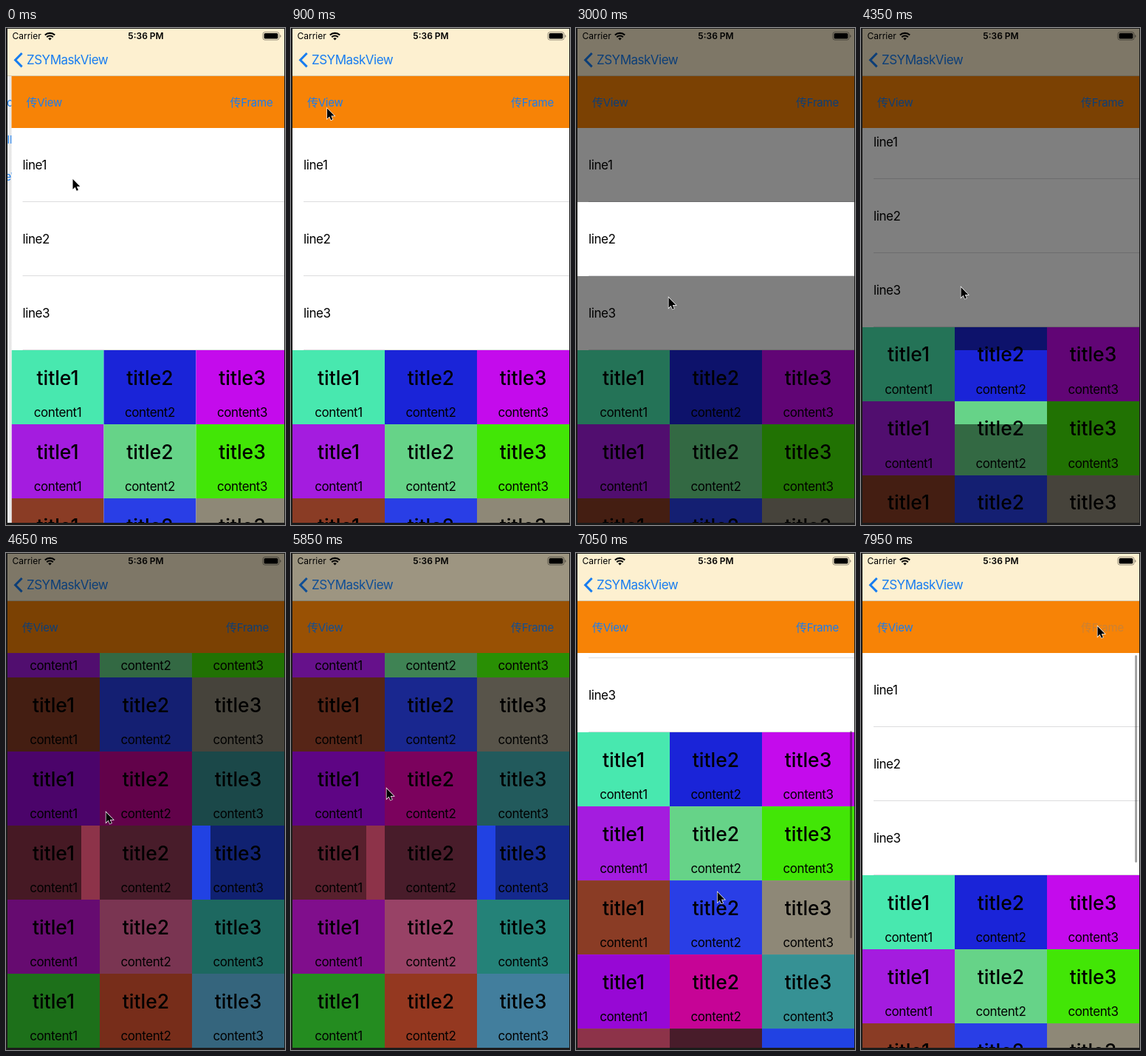
Write an HTML page that moves like this. It is 378 px wide and 671 px high and loops after 8000 ms.

```html
<!DOCTYPE html>
<html lang="zh">
<head>
<meta charset="utf-8">
<title>Mask view</title>
<style>
  html, body { margin: 0; width: 100%; height: 100%; overflow: hidden; background: #1b1b1b; }
  svg { display: block; width: 378px; height: 671px; }
  text { font: 17px Inter, "Noto Sans CJK SC", "Noto Sans CJK", sans-serif; letter-spacing: -.41px; white-space: pre; }
  .mid { text-anchor: middle; }
  .title { font-size: 26.5px; font-weight: 500; letter-spacing: 0; }
  .blue { fill: #187df0; }
  .btn { font-size: 15px; letter-spacing: -.24px; }
  .status { font-size: 12px; letter-spacing: 0; }
  .clock { font-weight: 600; }
</style>
</head>
<body>
<svg viewBox="0 0 378 671">
  <defs>
    <clipPath id="screen"><rect x="2" y="1" width="375" height="667"/></clipPath>
    <clipPath id="view"><rect x="2" y="135" width="375" height="533"/></clipPath>
    <linearGradient id="shade">
      <stop offset="0" stop-color="#f1f1f1"/><stop offset="1" stop-color="#dedede"/>
    </linearGradient>
  </defs>
  <rect width="378" height="671" fill="#1b1b1b"/>
  <g clip-path="url(#screen)">
    <g id="under">
      <rect x="2" y="65" width="8" height="603" fill="url(#shade)"/>
      <text class="blue btn" x="1" y="105.5">c</text>
      <text class="blue btn" x="1.5" y="155.5">ll</text>
      <text class="blue btn" x="-1.5" y="205.5">eV</text>
    </g>
    <g id="page">
      <rect x="2" y="65" width="375" height="603" fill="#fff"/>
      <g clip-path="url(#view)"><g id="list"></g></g>
      <rect x="2" y="65" width="375" height="70" fill="#f78306"/>
      <text id="viewBtn" class="blue btn" x="22" y="105.5">传View</text>
      <text id="frameBtn" class="blue btn" x="298" y="105.5">传Frame</text>
      <rect id="bar" x="371.2" width="2.8" height="280" rx="1.4" fill="#000" fill-opacity=".38"/>
    </g>
    <rect x="2" y="1" width="375" height="64" fill="#fdf0d0"/>
    <rect x="2" y="64.5" width="375" height=".5" fill="#000" fill-opacity=".3"/>
    <text class="status" x="8.5" y="15.4">Carrier</text>
    <g fill="none" stroke="#000" stroke-width="2.1">
      <path d="M52.8 9.6A9.6 9.6 0 0 1 66.2 9.6"/>
      <path d="M55.2 12.2A6.2 6.2 0 0 1 63.8 12.2"/>
    </g>
    <path d="M57.1 14A4.2 4.2 0 0 1 61.9 14L59.5 16.6Z"/>
    <text class="status clock mid" x="189.5" y="15.4">5:36 PM</text>
    <rect x="348" y="5.5" width="22" height="10.6" rx="2.8" fill="none" stroke="#000" stroke-opacity=".4"/>
    <rect x="349.6" y="7.1" width="18.8" height="7.4" rx="1.5"/>
    <path d="M371.2 9V12.8Q372.6 12.2 372.6 10.9T371.2 9Z" fill-opacity=".45"/>
    <path d="M21.6 34L12.6 43.2L21.6 52.4" fill="none" stroke="#187df0" stroke-width="3"/>
    <text class="blue" style="letter-spacing:-.5px" x="28" y="49.3">ZSYMaskView</text>
    <path id="dim" fill-rule="evenodd"/>
  </g>
  <path id="cursor" d="M0 0V14.6L3.3 11.4L5.5 16.5L7.8 15.5L5.6 10.5H10.3Z" stroke="#fff" stroke-width="1.4" paint-order="stroke"/>
</svg>
<script>
const LOOP = 8000, STEP = 150, BOTTOM = 467;
const $ = id => document.getElementById(id);
const set = (id, name, value) => $(id).setAttribute(name, value);

// Smooth progress from 0 to 1 between two times
function ease(t, from, to) {
  const p = Math.min(1, Math.max(0, (t - from) / (to - from)));
  return p * p * (3 - 2 * p);
}

const cells = [
  "#48e8af #1a24d8 #c40bec",
  "#a41cdf #66d388 #42e606",
  "#8a3c25 #293ee6 #8e8877",
  "#9708d5 #c60496 #369194",
  "#8d3349 #481c2a #2142e3",
  "#ce17e2 #f56aa5 #3ad2c2",
  "#3ae234 #ef5a34 #6acbfc"
].map(row => row.split(" "));

function buildList() {
  let out = "";
  for (let i = 0; i < 3; i++) {
    const y = 135 + i * 100;
    out += `<text x="17" y="${y + 56}">line${i + 1}</text>` +
      `<rect x="17" y="${y + 99}" width="360" height="1" fill="#dcdcde"/>`;
  }
  cells.forEach((row, r) => row.forEach((color, c) => {
    const x = 2 + c * 125, y = 435 + r * 100, mid = x + 62.5;
    out += `<rect x="${x}" y="${y}" width="125" height="100" fill="${color}"/>` +
      `<text class="mid title" x="${mid}" y="${y + 46.5}">title${c + 1}</text>` +
      `<text class="mid" x="${mid}" y="${y + 89.7}">content${c + 1}</text>`;
  }));
  $("list").innerHTML = out;
}

// Pointer moves: from, to, x, y
const moves = [
  [0, 1050, 46, 103], [1650, 2250, 124, 345], [2700, 3000, 125, 364], [3600, 4200, 135, 350],
  [5250, 5550, 129, 318], [6000, 6450, 184, 189], [6450, 7200, 192, 489], [7200, 7950, 320, 99]
];

function pointer(t) {
  let x = 90, y = 204;
  for (const [from, to, toX, toY] of moves) {
    const p = ease(t, from, to);
    x += (toX - x) * p;
    y += (toY - y) * p;
  }
  return [x, y];
}

function hole(t) {
  if (t < 2550) return [22, 85, 49, 30];
  if (t < 3450) return [2, 235, 375, 100];
  if (t < 4650) return [127, 435, 125, 100];
  return [102, 368, 175, 100];
}

function draw(now) {
  const t = Math.floor(now % LOOP / STEP) * STEP;
  const entering = t < STEP;
  const top = BOTTOM * (ease(t, 4294, 4650) - ease(t, 6450, 7525));
  const [x, y] = pointer(t);
  const [hx, hy, hw, hh] = hole(t);
  set("page", "transform", `translate(${entering ? 5.5 : 0} 0)`);
  set("under", "opacity", entering ? 1 : 0);
  set("list", "transform", `translate(0 ${-top})`);
  set("bar", "y", 138 + top * .53);
  set("bar", "opacity", t >= 6450 ? 1 : 0);
  set("viewBtn", "opacity", t < 1350 ? 1 : .2 + .8 * ease(t, 1350, 1650));
  set("frameBtn", "opacity", t < 7950 ? 1 : .2);
  set("dim", "d", `M2 1H377V668H2ZM${hx} ${hy}h${hw}v${hh}h${-hw}Z`);
  set("dim", "opacity", .5 * (ease(t, 1350, 1583) - ease(t, 5713, 6141)));
  set("cursor", "transform", `translate(${x + .5} ${y}) scale(.95)`);
}

buildList();
const start = performance.now();
function tick() {
  draw(performance.now() - start);
  requestAnimationFrame(tick);
}
tick();
</script>
</body>
</html>
```
